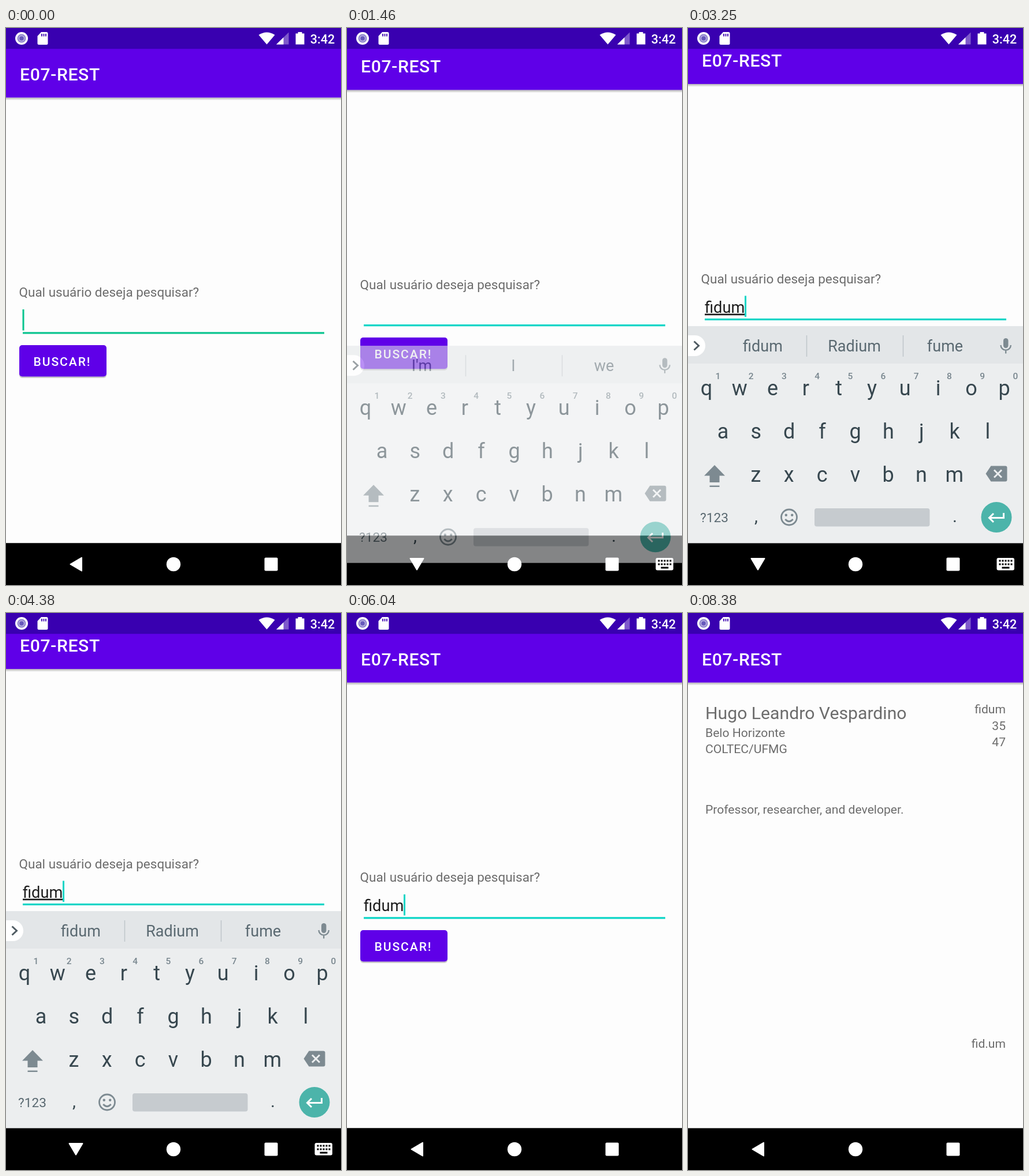
An HTML page for the animation above (8.5 s loop, 580 px wide and 966 px high).

```html
<!DOCTYPE html>
<html lang="pt">
<head>
<meta charset="utf-8">
<title>E07-REST</title>
<style>
  html, body { margin: 0; width: 100%; height: 100%; overflow: hidden; background: #000; }
  svg { display: block; width: 100vw; height: 100vh; font-family: Roboto, "Noto Sans", sans-serif; }
  .medium { font-weight: 500; }
  .mid { text-anchor: middle; }
  .end { text-anchor: end; }
</style>
</head>
<body>
<svg viewBox="0 0 580 966">
  <defs>
    <linearGradient id="shade" x2="0" y2="1">
      <stop stop-opacity=".3"/><stop offset="1" stop-opacity="0"/>
    </linearGradient>
    <clipPath id="buttonClip"><rect x="23" y="550" width="151" height="54.5" rx="5"/></clipPath>
    <clipPath id="screenClip"><rect width="580" height="893.5"/></clipPath>
    <g id="page">
      <rect width="580" height="893.5" fill="#fdfdfd"/>
      <rect y="120.6" width="580" height="5" fill="url(#shade)"/>
      <rect width="580" height="120.6" fill="#5f00e8"/>
      <text class="medium" x="24" y="90.5" font-size="30.2" letter-spacing=".65" fill="#fff">E07-REST</text>
    </g>
  </defs>
  <rect width="580" height="966"/>

  <g clip-path="url(#screenClip)">
    <g id="search">
      <use href="#page"/>
      <text x="22.5" y="466" font-size="22.5" fill="#6c6c6c">Qual usuário deseja pesquisar?</text>
      <text id="typed" x="29" y="517" font-size="27.2" fill="#1c1c1c"></text>
      <g id="accent">
        <rect x="29" y="527.3" width="522" height="3.2"/>
        <rect id="cursor" y="488" width="3" height="36.5"/>
      </g>
      <rect x="23" y="552.5" width="151" height="54.5" rx="5" opacity=".2"/>
      <rect x="23" y="550" width="151" height="54.5" rx="5" fill="#5f00e8"/>
      <circle id="touch" cx="98" cy="577" fill="#fff" clip-path="url(#buttonClip)"/>
      <text class="medium" x="47.5" y="585.7" font-size="21.1" letter-spacing="1.9" fill="#fff">BUSCAR!</text>
    </g>
    <g id="result">
      <use href="#page"/>
      <g id="profile" font-size="21.1" fill="#6c6c6c">
        <text x="30" y="183.5" font-size="30.2">Hugo Leandro Vespardino</text>
        <text x="30" y="214.5">Belo Horizonte</text>
        <text x="30" y="243">COLTEC/UFMG</text>
        <text x="30" y="347.5">Professor, researcher, and developer.</text>
        <g class="end">
          <text x="550" y="174">fidum</text>
          <text x="550" y="202.5">35</text>
          <text x="550" y="231">47</text>
          <text x="550" y="753.5">fid.um</text>
        </g>
      </g>
    </g>
  </g>

  <g id="keyboard">
    <rect y="517" width="580" height="376.5" fill="#eceeef"/>
    <rect y="517" width="580" height="65" fill="#e3e6e8"/>
    <path d="M0 533h12a18 18 0 0 1 0 36H0z" fill="#fff"/>
    <path d="M10.5 543.5l8 7.5-8 7.5" fill="none" stroke="#4f5b62" stroke-width="3"/>
    <g id="hints" class="mid" font-size="27" fill="#5a6971">
      <path d="M205.5 533v37M372.5 533v37" stroke="#bfc5c9" stroke-width="1.5"/>
      <text x="129.5" y="561"></text><text x="288" y="561"></text><text x="445" y="561"></text>
    </g>
    <g fill="#7d8a91">
      <rect x="546" y="538" width="8.5" height="17" rx="4.2"/>
      <path d="M541.5 550a8.7 8.7 0 0 0 17.4 0M550.2 558.5v6" fill="none" stroke="#7d8a91" stroke-width="2.3"/>
      <path d="M46 758l18 18.5H54.5V788H37.5V776.5H28z"/>
      <rect x="37.5" y="793.5" width="17" height="2.5"/>
      <path d="M515.5 773l9-13.5h25q3 0 3 3v21q0 3-3 3h-25z"/>
    </g>
    <path d="M530 766.5l13 13m0-13l-13 13" stroke="#eceeef" stroke-width="3"/>
    <g id="keys" class="mid" font-size="36" fill="#37474f"></g>
    <g class="mid" fill="#5a6971">
      <text x="45.5" y="857" font-size="22.6">?123</text>
      <text x="118" y="857" font-size="30" fill="#37474f">,</text>
      <text x="462" y="857" font-size="30" fill="#37474f">.</text>
    </g>
    <g fill="none" stroke="#7d8a91" stroke-width="2.8">
      <circle cx="175" cy="848.5" r="13.5"/>
      <path d="M168.3 852q6.7 7.5 13.4 0"/>
    </g>
    <g fill="#7d8a91"><circle cx="169.8" cy="844.7" r="2.2"/><circle cx="180.2" cy="844.7" r="2.2"/></g>
    <rect x="219" y="833" width="199.5" height="31.5" rx="4" fill="#c6cbcf"/>
    <circle cx="534" cy="848.5" r="26.5" fill="#4cb4aa"/>
    <path d="M546.5 841v8.5H522m7-7.5l-7.5 7.5 7.5 7.5" fill="none" stroke="#fff" stroke-width="3"/>
  </g>

  <g fill="#fff">
    <rect id="backTouch" x="41" y="893.5" width="160" height="73" rx="36.5"/>
    <path id="back" d="M111.5 930L131 918.5v23z" stroke="#fff" stroke-width="2" stroke-linejoin="round"/>
    <circle cx="290" cy="930" r="12.2"/>
    <rect x="447.5" y="918.5" width="23" height="23" rx="2"/>
    <g id="switch">
      <rect x="534.5" y="919" width="30.5" height="21.5" rx="3"/>
      <path d="M538.5 924h23M538.5 930h23" stroke="#000" stroke-width="3" stroke-dasharray="3 2"/>
      <path d="M543.5 936h13" stroke="#000" stroke-width="3"/>
    </g>
  </g>

  <rect width="580" height="36.2" fill="#3900b0"/>
  <g fill="#fff">
    <circle cx="27" cy="18" r="11"/>
    <circle cx="27" cy="18" r="7.5" fill="#8d82cd"/>
    <circle cx="27" cy="18" r="5.5" fill="#b9b0e2"/>
    <circle cx="27" cy="18" r="3.8" fill="#6658bb"/>
    <path d="M61 7h9q2.5 0 2.5 2.5v17q0 2.5-2.5 2.5H57q-2.5 0-2.5-2.5V14z"/>
    <path d="M62 10v4.500M65.500 10v4.500M69 10v4.500" stroke="#3900b0" stroke-width="1.8"/>
    <path d="M437.5 12q14-9 28 0l-14 16.5z"/>
    <path d="M468 28.5L489.5 7.5v21z" opacity=".35"/>
    <path d="M468 28.5L480.5 16.3v12.2z"/>
    <path d="M501.5 9.5h4V7h7v2.5h4V28.5h-15z"/>
    <text class="medium" x="526.8" y="26.5" font-size="21.5">3:42</text>
  </g>
</svg>
<script>
const LOOP = 8500, WORD = "fidum", PAN = 23.5;
const OPEN = 1380, CLOSE = 5000, TAP = 6230, LAUNCH = 6450, LOADED = 7040;
const strokes = [2050, 2290, 2520, 2760, 3000];
const guesses = ["I'm I we", "f for from", "fi find fine", "fid find food", "fidu field find", "fidum Radium fume"];

const $ = id => document.getElementById(id);
const clamp = v => Math.min(1, Math.max(0, v));
const span = (t, start, length) => clamp((t - start) / length);
const easeOut = (u, power = 2) => 1 - (1 - u) ** power;
const set = (id, values) => Object.entries(values).forEach(([k, v]) => $(id).setAttribute(k, v));
const shift = y => `translate(0 ${y})`;

function buildKeys() {
  const label = (x, y, s, extra = "") => `<text x="${x}" y="${y}" ${extra}>${s}</text>`;
  const rows = [["qwertyuiop", 32, 637], ["asdfghjkl", 60.5, 712], ["zxcvbnm", 117.5, 786.5]];
  let out = "";
  for (const [letters, x, y] of rows)
    [...letters].forEach((c, i) => out += label(x + 57.3 * i, y, c));
  for (let i = 0; i < 10; i++)
    out += label(52 + 57.2 * i, 609, (i + 1) % 10, 'class="medium" font-size="15.5" fill="#78868e"');
  $("keys").innerHTML = out;
}

function cursorOn(t) {
  if (t < strokes[0]) return (t + 300) % 1000 < 500;
  return t < strokes[4] || (t - strokes[4]) % 1000 < 500;
}

function draw(t) {
  const closing = t >= CLOSE;

  // Keyboard window and the page panning with it
  const rise = easeOut(span(t, OPEN, 240));
  const drop = span(t, CLOSE, 260) ** 2;
  const pan = closing ? 1 - easeOut(span(t, CLOSE, 230)) : rise;
  set("search", { transform: shift(-PAN * pan) });
  set("keyboard", {
    transform: shift(78 * (closing ? drop : 1 - rise)),
    opacity: closing ? clamp(1 - 1.12 * drop) : rise
  });

  // Typed text
  const count = strokes.filter(s => t >= s).length;
  const typed = $("typed");
  typed.textContent = WORD.slice(0, count);
  typed.style.textDecoration = count && !closing ? "underline" : "none";
  set("cursor", {
    x: count ? 28.8 + typed.getComputedTextLength() : 28.5,
    opacity: +cursorOn(t)
  });
  set("accent", { fill: t < 200 ? "#08c48e" : "#08d5c6" });

  const words = guesses[count].split(" ");
  set("hints", { opacity: +!closing });
  $("hints").querySelectorAll("text").forEach((el, i) => el.textContent = words[i]);

  // Navigation bar
  const shown = t >= OPEN && !closing;
  set("back", { transform: shown ? "rotate(-90 121 930)" : "" });
  set("switch", { opacity: +shown });
  set("backTouch", { opacity: 0.17 * span(t, CLOSE - 110, 80) * (1 - span(t, CLOSE + 140, 250)) });

  // Button press, then the profile page sliding in
  set("touch", {
    r: 90 * easeOut(span(t, TAP, 220)),
    opacity: 0.24 * (1 - span(t, TAP + 200, 200))
  });
  set("result", {
    transform: shift(71 * (1 - easeOut(span(t, LAUNCH, 350), 5))),
    opacity: easeOut(span(t, LAUNCH, 200), 4)
  });
  set("profile", { opacity: +(t >= LOADED) });
}

buildKeys();
const start = performance.now();
function tick() {
  draw((performance.now() - start) % LOOP);
  requestAnimationFrame(tick);
}
tick();
</script>
</body>
</html>
```
